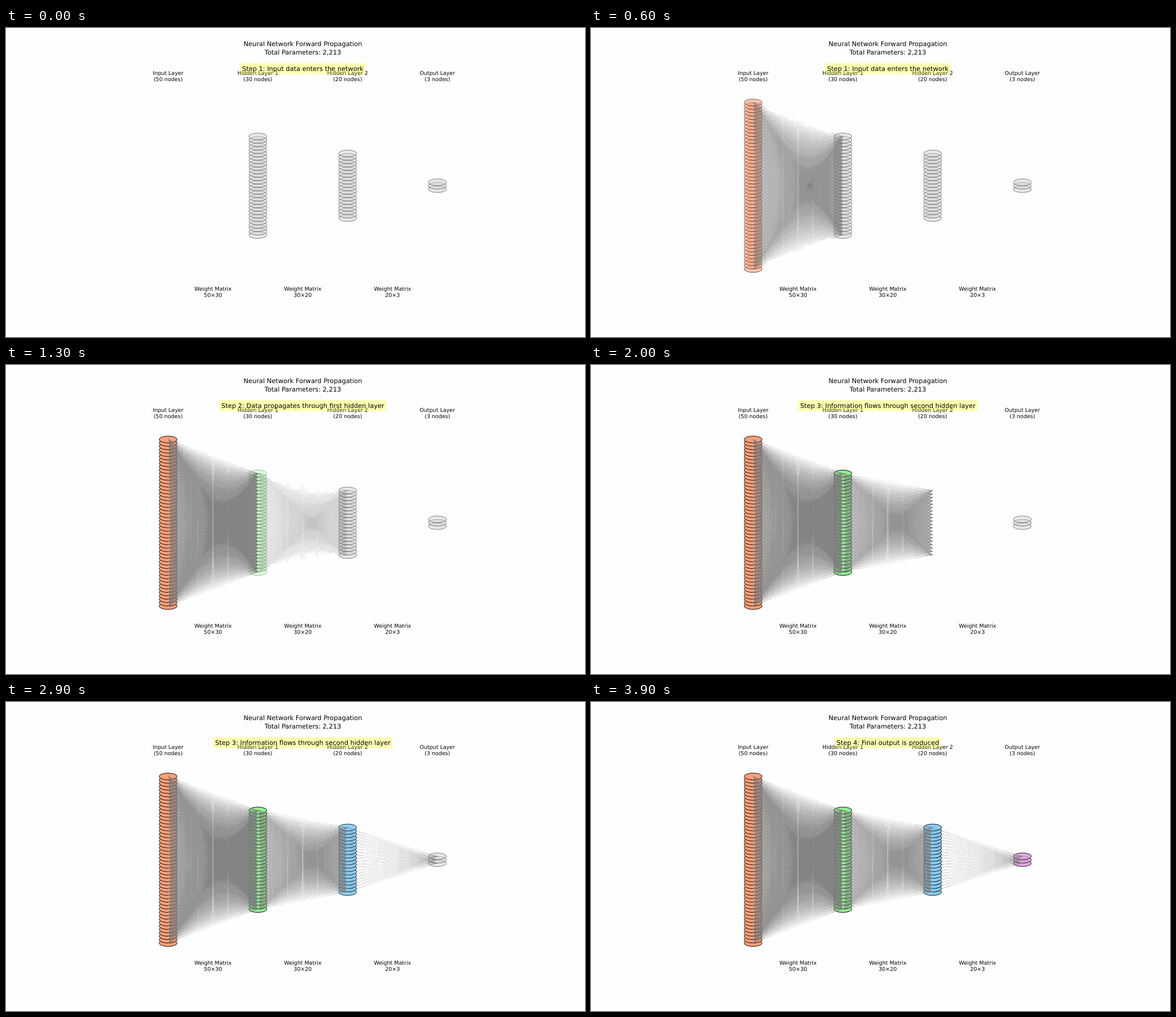
An HTML page with a canvas for the animation above (4000 ms loop, 1025x547 px).

```html
<!DOCTYPE html>
<html lang="en">
<head>
<meta charset="utf-8">
<title>Forward propagation</title>
<style>
  html, body { margin: 0; width: 100%; height: 100%; overflow: hidden; background: #fefefe; }
  canvas, svg { position: absolute; left: 0; top: 0; width: 1025px; height: 547px; }
  text {
    font-family: "DejaVu Sans", sans-serif;
    text-anchor: middle;
    text-rendering: geometricPrecision;
  }
  .big { font-size: 11.39px; }
  .small { font-size: 9.5px; }
</style>
</head>
<body>
<canvas id="stage" width="1025" height="547"></canvas>
<svg id="words" viewBox="0 0 1025 547">
  <text class="big" x="525.5" y="32">Neural Network Forward Propagation</text>
  <text class="big" x="525.5" y="47">Total Parameters: 2,213</text>
  <g id="labels"></g>
  <rect id="box" y="62.2" height="19.6" fill="#ff0" fill-opacity=".3"/>
  <text id="caption" class="big" x="525.5" y="75.5"></text>
</svg>
<script>
const PAPER = 254, LINE = 128, LINE_ALPHA = 0.4, LINE_WIDTH = 0.475;
const LOOP = 4000, TICK = 100, TICKS_PER_STEP = 10;
const UNIT_X = 158.875, UNIT_Y = 60.17, MID_Y = 276.235;
const AREA = { x: 265, y: 110, w: 525, h: 335 };

const layers = [
  { name: 'Input Layer', n: 50, rgb: '255,160,122' },
  { name: 'Hidden Layer 1', n: 30, rgb: '144,238,144' },
  { name: 'Hidden Layer 2', n: 20, rgb: '135,206,250' },
  { name: 'Output Layer', n: 3, rgb: '221,160,221' }
];
const captions = [
  'Step 1: Input data enters the network',
  'Step 2: Data propagates through first hidden layer',
  'Step 3: Information flows through second hidden layer',
  'Step 4: Final output is produced'
];

const ctx = document.getElementById('stage').getContext('2d', { willReadFrequently: true });
const labels = document.getElementById('labels');
const box = document.getElementById('box');
const caption = document.getElementById('caption');

const layerX = k => 128.125 + UNIT_X * (k + 1);
const nodeY = (n, i) => MID_Y - UNIT_Y * (i / 10 - n / 20);

function addLabel(x, y, text) {
  const el = document.createElementNS('http://www.w3.org/2000/svg', 'text');
  el.setAttribute('class', 'small');
  el.setAttribute('x', x);
  el.setAttribute('y', y);
  el.textContent = text;
  labels.append(el);
}

layers.forEach((layer, k) => {
  addLabel(layerX(k), 83, layer.name);
  addLabel(layerX(k), 94, `(${layer.n} nodes)`);
  const next = layers[k + 1];
  if (next) {
    addLabel(layerX(k + 0.5), 465, 'Weight Matrix');
    addLabel(layerX(k + 0.5), 476, `${layer.n}×${next.n}`);
  }
});

function drawNodes(k, rgb, alpha) {
  const n = layers[k].n;
  ctx.fillStyle = `rgba(${rgb},${alpha})`;
  ctx.strokeStyle = `rgba(0,0,0,${alpha})`;
  ctx.lineWidth = 0.95;
  for (let i = 0; i < n; i++) {
    ctx.beginPath();
    ctx.ellipse(layerX(k), nodeY(n, i), UNIT_X / 10, UNIT_Y / 10, 0, 0, 7);
    ctx.fill();
    ctx.stroke();
  }
}

const ramp = z => z > 0 ? z * z / 2 : 0;

// 8-bit blending of one thin line, rounded down at every pixel
function blendLine(px, x0, y0, x1, y1, alpha) {
  const slope = (y1 - y0) / (x1 - x0);
  const thick = LINE_WIDTH * Math.sqrt(1 + slope * slope);
  const rise = Math.max(Math.abs(slope), 0.01);
  const outer = (thick + rise) / 2, inner = (thick - rise) / 2;
  const below = u =>
    (ramp(u + outer) - ramp(u + inner) - ramp(u - inner) + ramp(u - outer)) / rise;
  for (let x = Math.floor(x0); x <= Math.floor(x1); x++) {
    const part = Math.min(x + 1, x1) - Math.max(x, x0);
    const yc = y0 + slope * (x + 0.5 - x0);
    const last = Math.floor(yc + outer);
    let y = Math.floor(yc - outer), sum = 0;
    for (; y <= last; y++) {
      const next = below(y + 1 - yc);
      const a = Math.round(alpha * Math.min(1, next - sum) * part);
      sum = next;
      if (a < 1) continue;
      const at = ((y - AREA.y) * AREA.w + x - AREA.x) * 4;
      for (let c = at; c < at + 3; c++) {
        const p = px[c];
        px[c] = ((LINE * 256 - p * 255) * a + p * 65280) / (65280 + a) | 0;
      }
    }
  }
}

function drawLinks(px, k, strength) {
  const alpha = Math.round(255 * LINE_ALPHA * strength);
  const from = layers[k].n, to = layers[k + 1].n;
  for (let i = 0; i < from; i++)
    for (let j = 0; j < to; j++)
      blendLine(px, layerX(k), nodeY(from, i), layerX(k + 1), nodeY(to, j), alpha);
}

// the fans are shown in a few flat grey tones
const tone = v => v > 235 ? PAPER : 132 + 16 * Math.max(0, Math.round((v - 132) / 16));

function draw(tick) {
  const step = Math.floor(tick / TICKS_PER_STEP);
  const progress = tick % TICKS_PER_STEP / TICKS_PER_STEP;

  ctx.fillStyle = `rgb(${PAPER},${PAPER},${PAPER})`;
  ctx.fillRect(0, 0, 1025, 547);
  layers.forEach((layer, k) => {
    if (k > step) drawNodes(k, '211,211,211', 0.5);
    else drawNodes(k, layer.rgb, k < step ? 1 : progress);
  });

  const image = ctx.getImageData(AREA.x, AREA.y, AREA.w, AREA.h);
  const base = new Uint32Array(image.data.slice().buffer);
  const px = image.data;
  for (let k = 0; k <= step && k < 3; k++) {
    const strength = k < step ? 1 : progress;
    if (strength) drawLinks(px, k, strength);
  }
  const blank = base[0];
  for (let i = 0; i < base.length; i++) {
    if (base[i] !== blank || px[i * 4] === PAPER) continue;
    px[i * 4] = px[i * 4 + 1] = px[i * 4 + 2] = tone(px[i * 4]);
  }
  ctx.putImageData(image, AREA.x, AREA.y);

  if (caption.textContent !== captions[step]) {
    caption.textContent = captions[step];
    const width = caption.getComputedTextLength() + 7.6;
    box.setAttribute('x', 525.4 - width / 2);
    box.setAttribute('width', width);
  }
}

const start = performance.now();
let shown = -1;
function loop() {
  const tick = Math.floor((performance.now() - start) % LOOP / TICK);
  if (tick !== shown) draw(shown = tick);
  requestAnimationFrame(loop);
}
loop();
</script>
</body>
</html>
```
